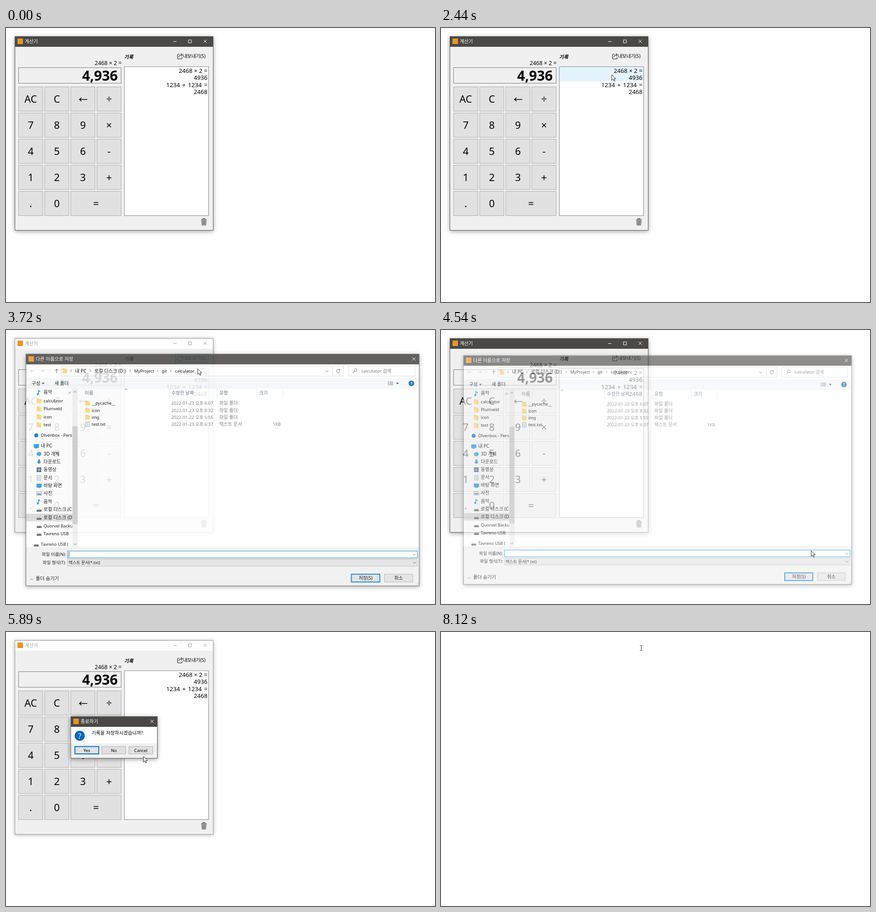
Recreate the animation shown at these times as an HTML page. Size 937 px wide and 598 px high, loop 8.62 s.

```html
<!DOCTYPE html>
<html lang="ko">
<head>
<meta charset="utf-8">
<title>계산기</title>
<style>
html, body { margin: 0; width: 100%; height: 100%; overflow: hidden; background: #fff; }
svg { display: block; width: 937px; height: 598px; font-family: 'Noto Sans', 'Noto Sans CJK KR', 'Noto Sans CJK', sans-serif; }
.shade { fill: #f0f0f0; stroke: #5a5a5a; filter: drop-shadow(0 2px 5px rgba(0,0,0,.38)); }
.bar { fill: #4a4947; }
.cap { fill: #fff; }
.sign { fill: none; stroke: #fff; }
.off .bar { fill: #fff; }
.off .cap { fill: #999; }
.off .sign { stroke: #999; }
.off .shade { stroke: #999; filter: drop-shadow(0 1px 4px rgba(0,0,0,.3)); }
.line { fill: none; stroke: #555; }
</style>
</head>
<body>
<svg id="stage" viewBox="0 0 937 598"></svg>
<script>
const LOOP = 8620;
const BLUE = '#0078d7', BTN = '#e1e1e1', EDGE = '#adadad', GOLD = '#ffd978', APP = '#ed9425';

// ---- drawing helpers ----
const rect = (x, y, w, h, fill, more = '') => `<rect x="${x}" y="${y}" width="${w}" height="${h}" fill="${fill}" ${more}/>`;
const box = (x, y, w, h, fill, stroke, more = '') => rect(x, y, w, h, fill, `stroke="${stroke}" ${more}`);
const path = (d, more = 'class="line"') => `<path d="${d}" ${more}/>`;
const text = (x, y, s, size, more = '') =>
  `<text x="${x}" y="${y}" font-size="${size || (/[가-힣]/.test(s) ? 10.2 : 9.3)}" ${more}>${s}</text>`;
const mid = 'text-anchor="middle"', end = 'text-anchor="end"';
const group = (id, body, more = '') => `<g id="${id}" ${more}>${body}</g>`;
const chevron = (x, y, up = 1) => path(`M${x - 3} ${y + 1.5 * up}L${x} ${y - 1.5 * up}L${x + 3} ${y + 1.5 * up}`);
const cross = (x, y) => path(`M${x - 3.5} ${y - 3.5}l7 7m0 -7l-7 7`, 'class="sign"');

const frame = (x, y, w, h, title, closeX, extra = '') =>
  rect(x + .5, y + .5, w - 1, h - 1, '#f0f0f0', 'class="shade"') +
  rect(x + 1, y + 1, w - 2, 22, '', 'class="bar"') +
  rect(x + 6, y + 5, 12, 12, APP) + extra +
  text(x + 22, y + 14.7, title, 10.4, 'class="cap"') + cross(closeX, y + 11);

const button = (x, y, w, h, label, id = '', main = false) =>
  box(x + .5, y + .5, w - 1, h - 1, BTN, main ? BLUE : EDGE, `id="${id}" ${main ? 'stroke-width="2"' : ''}`) +
  text(x + w / 2, y + h / 2 + 3.5, label, 0, mid);

// ---- calculator ----
function keypad() {
  const rows = ['AC C ← ÷', '7 8 9 ×', '4 5 6 -', '1 2 3 +', '. 0 ='];
  let out = '';
  rows.forEach((row, r) => row.split(' ').forEach((k, c) => {
    const x = 27.5 + 57 * c, y = 128.5 + Math.floor(57.2 * r), w = k === '=' ? 110 : 53;
    out += box(x, y, w, 53, BTN, EDGE);
    out += k === '←'
      ? path(`M${x + 36} ${y + 27.5}h-17m4.5 -4l-4.5 4l4.5 4`, 'fill="none" stroke="#000" stroke-width="1.6"')
      : text(x + w / 2, y + 34.5, k, 22, mid);
  }));
  return out;
}

const trash = path('M426 418.5h12.5M430 418v-2h4.5v2', 'fill="none" stroke="#777" stroke-width="1.8"') +
  path('M427 420.5h10.5l-1 10h-8.5z', 'fill="#a2a2a2" stroke="#808080"') +
  path('M430.3 422v7m2 -7v7m2 -7v7', 'stroke="#666" stroke-width=".8"');

const exportIcon = path('M379 57h-2.5q-2 0-2 2v6.500q0 2 2 2h6q2 0 2-2v-2M377.500 64q0-5 6-5.500M382 55.500l3.500 3l-3.500 3',
  'fill="none" stroke="#222" stroke-width="1.1"');

const calc = frame(19, 18, 434, 424, '계산기', 435,
    rect(419, 19, 33, 22, '#e81123', 'id="red"') +
    path('M365 29.500h7.500M398.500 26h6.500v6.500h-6.500z', 'class="sign"')) +
  text(258, 67, '기록', 10.8, 'font-weight="700" font-style="italic"') +
  box(370.5, 52.5, 71, 18, '#e5f1fb', BLUE, 'id="exportHover"') +
  group('export', exportIcon + text(386.5, 65.3, '내보내기(S)')) +
  text(252.5, 81.3, '', 12.3, `${end} id="expr"`) +
  box(27.5, 86.5, 224, 34, '#f0f0f0', '#7c7c7c') +
  text(244, 115, '', 30.2, `${end} id="total" font-weight="700"`) +
  keypad() +
  box(258.5, 84.5, 184, 325, '#fff', '#828790') +
  rect(259, 85, 183, 31.5, '#e5f3ff', 'id="row1"') +
  rect(259, 116.5, 183, 31, '#e5f3ff', 'id="row2"') +
  group('history',
    text(440, 98, '2468 × 2 =', 13.1, end) + text(440, 113, '4936', 13.1, end) +
    text(440, 129, '1234 + 1234 =', 13.1, end + ' word-spacing="1.6"') + text(440, 143.7, '2468', 13.1, end)) +
  group('trash', trash);

// ---- save dialog ----
function icon(kind, x, y) {
  switch (kind) {
    case 'folder': return rect(x - 5, y - 5, 5, 3, '#e8b64c') + rect(x - 5, y - 4, 10, 9.500, GOLD);
    case 'note': return path(`M${x - 1} ${y + 4}v-9q1 3 4 4`, 'fill="none" stroke="#1c8fe0" stroke-width="1.6"') +
      `<circle cx="${x - 2.5}" cy="${y + 4}" r="2.2" fill="#1c8fe0"/>`;
    case 'doc': return box(x - 4, y - 5, 8, 10, '#fff', '#8b98a5') +
      path(`M${x - 2} ${y - 2}h4m-4 2h4m-4 2h4`, 'stroke="#8b98a5" stroke-width=".8"');
    case 'drive': return path(`M${x - 5} ${y + 1}l2 -2h7l1.500 2z`, 'fill="#bbb"') + rect(x - 5, y + 1, 10.500, 3.500, '#555');
    case 'screen': return rect(x - 5.500, y - 4, 11.500, 8, '#1a9de8') + rect(x - 3, y + 4, 6, 1.200, '#667');
    case 'cube': return path(`M${x} ${y - 5}l5 2.500v5l-5 2.500l-5 -2.500v-5z`, 'fill="#27a9dd"');
    case 'down': return path(`M${x - 2} ${y - 5}h4v5h3l-5 5l-5 -5h3z`, 'fill="#2b87d3"');
    case 'film': return rect(x - 5, y - 5, 10, 10, '#4a5560') + rect(x - 3, y - 3, 6, 6, '#7fa6cc');
    case 'photo': return box(x - 5.500, y - 4, 11, 8, '#dcebf5', '#9aa') + rect(x - 4, y, 8, 2.500, '#4b7d9c');
    default: return `<circle cx="${x}" cy="${y}" r="4.5" fill="#1272c8"/>`;
  }
}

const nav = [
  [135.5, '음악', 'note'], [154, 'calculator', 'folder'], [171.5, 'Plumveld', 'folder'], [189, 'icon', 'folder'],
  [206.5, 'test', 'folder'], [229.5, 'Olvenbox - Pers', 'cloud', 1], [252.5, '내 PC', 'screen', 1],
  [270, '3D 개체', 'cube'], [287, '다운로드', 'down'], [304.5, '동영상', 'film'], [322, '문서', 'doc'],
  [339, '바탕 화면', 'screen'], [356.5, '사진', 'photo'], [374, '음악', 'note'], [391.5, '로컬 디스크 (C', 'drive'],
  [409, '로컬 디스크 (D', 'drive'], [427, 'Quorvel Backu', 'drive'], [444, 'Tavreno USB', 'drive'],
  [467.5, 'Tavreno USB (', 'drive', 1]
].map(([y, s, kind, top]) => icon(kind, top ? 66 : 72, y + .5) + text(top ? 76 : 82, y + 3.6, s)).join('');

const files = [['__pycache__', '23 오후 6:07'], ['icon', '23 오후 8:32'], ['img', '22 오후 5:55'], ['test.txt', '23 오후 6:37']]
  .map(([name, date], i) => {
    const y = 159.7 + 15.3 * i, isDoc = i === 3, grey = 'fill="#6d6d6d"';
    return icon(isDoc ? 'doc' : 'folder', 178, y) + text(187, y + 3.5, name) +
      text(361, y + 3.5, '2022-01-' + date, 9.6, grey) + text(466, y + 3.5, isDoc ? '텍스트 문서' : '파일 폴더', 0, grey) +
      (isDoc ? text(600, y + 3.5, '1KB', 9.3, grey + end) : '');
  }).join('');

const crumbs = [[151, '내 PC'], [193, '로컬 디스크 (D:)'], [280, 'MyProject'], [340, 'git'], [369, 'calculator']]
  .map(([x, s]) => path(`M${x - 10} 86.500l2 2.500l-2 2.500`) + text(x, 92.5, s)).join('');

const heads = [[172, '이름'], [361, '수정한 날짜'], [466, '유형'], [553, '크기']]
  .map(([x, s]) => text(x, 141, s, 0, 'fill="#4c607a"')).join('');

const arrow = (x, dir, color) => path(`M${x - 4 * dir} 89.500h${8 * dir}m${-3 * dir} -3l${3 * dir} 3l${-3 * dir} 3`, `fill="none" stroke="${color}"`);
const drop = (x, y) => path(`M${x - 3} ${y - 1.5}h6l-3 3.500z`, 'fill="#444"');

const saver = frame(43, 52, 860, 507, '다른 이름으로 저장', 891) +
  rect(44, 75, 858, 30, '#fff') +
  arrow(57, -1, '#ccc') + arrow(79, 1, '#ccc') + path('M93.500 88.500l2 2l2 -2', 'fill="none" stroke="#ccc"') +
  path('M110.500 94v-8.500m-3.500 3.500l3.500 -3.500l3.500 3.500') +
  box(120.5, 78.5, 617, 22, '#fff', '#d9d9d9') + path('M713.500 79v21', 'stroke="#d9d9d9"') +
  icon('folder', 128.5, 89) + crumbs + chevron(701, 90, -1) +
  path('M729 87.500a3.700 3.700 0 1 0 .5 3M729.500 85v3h-3') +
  box(747.5, 78.5, 146, 22, '#fff', '#d9d9d9') +
  '<circle cx="763.5" cy="87.5" r="3" class="line"/>' + path('M761.500 90l-4 4') +
  text(776, 92.5, 'calculator 검색', 9.7, 'fill="#666"') +
  rect(44, 105, 858, 23, '#f5f6f7') + text(56, 119.8, '구성') + drop(81, 116.5) + text(106, 119.8, '새 폴더') +
  path('M834 113.500h3m1 0h8M834 116.500h3m1 0h8M834 119.500h3m1 0h8') + drop(855, 116.5) +
  '<circle cx="885.5" cy="116.5" r="6" fill="#0063b1"/>' + text(885.5, 120, '?', 9.5, mid + ' fill="#fff" font-weight="700"') +
  rect(44, 128, 858, 346, '#fff') + rect(44, 401, 101, 16.5, '#d9d9d9') +
  `<g clip-path="url(#navClip)">${nav}</g>` +
  path('M135 140l2.500 -2.500m-1 -2.500l4 4m-1 -5l2 2l-2.500 2', 'fill="none" stroke="#888"') +
  rect(145, 128, 11.5, 346, '#f0f0f0') + rect(145, 210, 11.5, 214, '#cdcdcd') + chevron(150.5, 135) + chevron(150.5, 467.5, -1) +
  path('M356.500 128v20M461 128v20M547.500 128v20M605.500 128v20', 'stroke="#e5e5e5"') + chevron(262, 129.5) + heads + files +
  text(131, 493, '파일 이름(N):', 9.5, end) + text(131, 511, '파일 형식(T):', 9.5, end) +
  box(134.5, 482.5, 764, 15, '#fff', BLUE) + path('M137.500 484.500v11', 'id="caret" stroke="#000"') + chevron(892, 490, -1) +
  box(134.5, 500.5, 764, 15, '#e3e3e3', '#b8b8b8') + text(137, 511.3, '텍스트 문서(*.txt)', 9.1) + chevron(892, 508, -1) +
  chevron(56, 544) + text(65, 546.5, '폴더 숨기기', 10.4) +
  button(754, 532.5, 63, 18, '저장(S)', '', true) + button(826, 532.5, 63, 18, '취소', 'saverCancel') +
  path('M899 557l3 -3m-6 3l6 -6', 'stroke="#bbb"');

// ---- confirm box ----
const confirmBox = frame(141, 184, 190, 92, '종료하기', 319) + rect(142, 207, 188, 36, '#fff') +
  '<circle cx="161" cy="226.5" r="11" fill="#0066b8"/>' + text(161, 232.5, '?', 17, mid + ' fill="#fff"') +
  text(187, 224, '기록을 저장하시겠습니까?', 10.4) +
  button(150, 249.5, 53, 17, 'Yes', '', true) + button(209, 249.5, 53, 17, 'No') + button(268, 249.5, 53, 17, 'Cancel', 'askCancel');

document.getElementById('stage').innerHTML =
  '<defs><clipPath id="navClip"><rect x="44" y="128" width="100.5" height="346"/></clipPath></defs>' +
  group('calc', calc) + group('saver', saver) + group('ask', confirmBox) +
  path('M0 0V12.300L2.900 9.600L4.900 14.200L6.900 13.300L5 8.900H8.800Z', 'id="pointer" fill="#fff" stroke="#111" stroke-width=".9"') +
  path('M434.500 29.500h2q1 0 1 1q0-1 1-1h1.500M437.500 30v10M434.500 40.500h2q1 0 1-1q0 1 1 1h1.500', 'id="beam" fill="none" stroke="#333"');

// ---- motion ----
const bursts = [[620, 1300, 11], [1490], [1830, 2040, 4], [2440], [2740, 3300, 9], [3460, 4280, 13], [4340, 5160, 13],
  [5230, 6090, 13], [6160, 6230, 2], [6370, 7030, 11], [7190, 7610, 7], [7780, 8120, 5]];
const ticks = [0, ...bursts.flatMap(([a, b = a, n = 1]) =>
  Array.from({ length: n }, (_, i) => a + (b - a) * i / Math.max(1, n - 1)))];
const route = [[580, 100, 38], [1300, 364, 126], [1770, 364, 126], [2040, 373, 102], [2680, 373, 102], [3300, 414, 62],
  [3460, 414, 62], [3720, 418, 84], [4280, 856, 538], [4400, 858, 540], [5090, 424, 28], [5160, 433, 30], [5260, 433, 30],
  [5890, 300, 272], [6090, 303, 257], [6390, 303, 257], [6950, 428, 418], [7130, 428, 418], [7610, 436, 34], [LOOP, 436, 34]];

const ramp = (t, a, b) => Math.min(1, Math.max(0, (t - a) / (b - a)));
const within = (t, a, b) => t >= a && t < b;
const smooth = p => p * p * (3 - 2 * p);
const hold = t => ticks.filter(k => k <= t + 14).at(-1);

function pointerAt(t) {
  const i = Math.max(1, route.findIndex(k => k[0] > t));
  const [a, x, y] = route[i - 1], [b, u, v] = route[i], p = smooth(ramp(t, a, b));
  return [x + (u - x) * p, y + (v - y) * p];
}

const ui = Object.fromEntries([...document.querySelectorAll('[id]')].map(e => [e.id, e]));
const show = (name, on) => ui[name].style.opacity = +on;
const paint = (name, fill, stroke) => { ui[name].setAttribute('fill', fill); ui[name].setAttribute('stroke', stroke); };

function zoom(name, cx, cy, fadeIn, fadeOut) {
  const s = 1 - .08 * (1 - fadeIn) ** 3 - .034 * fadeOut, alpha = fadeIn * (1 - fadeOut);
  ui[name].setAttribute('transform', s === 1 ? '' : `translate(${cx * (1 - s)} ${cy * (1 - s)}) scale(${s})`);
  ui[name].style.opacity = alpha;
  ui[name].style.display = alpha ? '' : 'none';
}

function render(time) {
  const t = hold(time), [x, y] = pointerAt(t);
  const over = (l, u, r, b) => t >= 620 && x >= l && x < r && y >= u && y < b;
  const saving = within(t, 3500, 4530), asking = within(t, 5300, 6360), free = !saving && !asking;
  const second = within(t, 1490, 2440), cleared = t > 7020;

  zoom('calc', 235.5, 230, 1, ramp(t, 7800, 8000));
  zoom('saver', 472.5, 305, ramp(t, 3560, 3760), ramp(t, 4480, 4650));
  zoom('ask', 235.5, 230, ramp(t, 5290, 5460), ramp(t, 6340, 6500));
  ui.calc.setAttribute('class', free ? '' : 'off');

  ui.expr.textContent = second ? '1234 + 1234 =' : '2468 × 2 =';
  ui.expr.setAttribute('word-spacing', second ? 1.6 : 0);
  ui.total.textContent = second ? '2,468' : '4,936';
  show('row1', t < 3460 && over(259, 85, 442, 116.5));
  show('row2', t < 3460 && over(259, 116.5, 442, 148));
  show('exportHover', within(t, 2740, 3500) && over(370, 52, 442, 71) || saving);
  show('history', !cleared);
  show('export', cleared ? .55 : 1);
  show('trash', cleared ? .7 : 1);
  show('red', free ? (t < 6000 ? ramp(t, 5060, 5160) : ramp(t, 7480, 7600)) : 0);

  const hot = over(826, 532, 889, 551);
  paint('saverCancel', hot ? '#e5f1fb' : BTN, hot ? BLUE : EDGE);
  const aim = asking && over(268, 249, 321, 267), press = within(t, 6150, 6220);
  paint('askCancel', press ? '#cce4f7' : aim ? '#e5f1fb' : BTN, press ? '#005499' : aim ? BLUE : EDGE);
  show('caret', (t - 3600) % 1060 < 530);

  const beam = t >= 7900;
  show('pointer', t >= 620 && !beam);
  show('beam', beam);
  ui.pointer.setAttribute('transform', `translate(${x} ${y})`);
}

const start = performance.now();
function loop() {
  render((performance.now() - start) % LOOP);
  requestAnimationFrame(loop);
}
loop();
</script>
</body>
</html>
```
